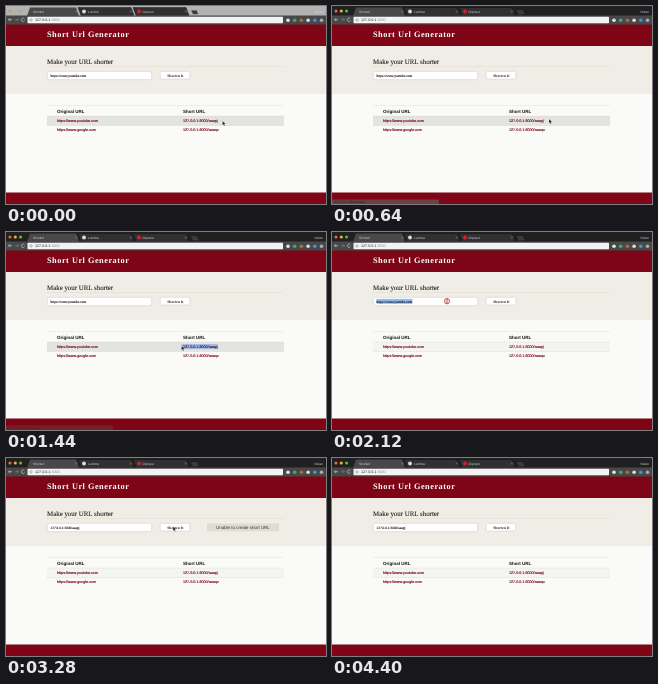
Recreate the animation shown at these times as an HTML page. Size 320x198 px, loop 4.64 s.

```html
<!DOCTYPE html>
<html lang="en">
<head>
<meta charset="utf-8">
<title>Short Url Generator</title>
<style>
html, body { margin: 0; width: 100%; height: 100%; overflow: hidden; background: #fafaf8; }
svg { display: block; width: 320px; height: 198px; text-rendering: geometricPrecision; }
text { font-family: "Liberation Sans", Arial, sans-serif; font-size: 3.7px; white-space: pre; }
.serif { font-family: "Liberation Serif", Times, serif; }
.tab { font-size: 3.2px; fill: #d4d4d4; }
.link { fill: #780019; stroke: #780019; stroke-width: .14; }
.head { font-size: 4.5px; font-weight: bold; fill: #111; }
.field { font-size: 3.45px; fill: #222; stroke: #222; stroke-width: .12; }
.dots { stroke: #c9c7be; stroke-width: .5; stroke-dasharray: .8 .8; }
</style>
</head>
<body>
<svg viewBox="0 0 320 198">
  <rect width="320" height="10" fill="#202020"/>
  <rect id="inactive" width="320" height="10" fill="#b2b2b2"/>
  <path d="M75 9.500l-3-8h53l3 8zM130 9.500l-3-8h53l3 8z" fill="#303030" stroke="#151515" stroke-width=".5"/>
  <path d="M21 10l3-8.500h46l3 8.500z" fill="#484848"/>
  <g id="lights">
    <circle cx="4" cy="5" r="1.600" fill="#ee5b50"/>
    <circle cx="9.300" cy="5" r="1.600" fill="#e5b43d"/>
    <circle cx="14.600" cy="5" r="1.600" fill="#55b848"/>
  </g>
  <text class="tab" x="27" y="6.600">Shorturl</text>
  <circle cx="78" cy="5.500" r="1.900" fill="#ddd"/>
  <text class="tab" x="82" y="6.600">Lumbra</text>
  <circle cx="133" cy="5.500" r="1.900" fill="#d61f2c"/>
  <text class="tab" x="136.300" y="6.600">Clipnest</text>
  <path d="M69.500 4.500l2 2m0-2l-2 2M124 4.500l2 2m0-2l-2 2M179 4.500l2 2m0-2l-2 2" stroke="#aaa" stroke-width=".4"/>
  <path d="M185.500 4.500h5l1.500 3.500h-5z" fill="#383838" stroke="#555" stroke-width=".4"/>
  <text class="tab" id="user" x="308.500" y="6.600">Nolan</text>
  <rect y="9.500" width="320" height="9.500" fill="#484848"/>
  <g fill="none" stroke="#ddd" stroke-width=".6">
    <path d="M6 13.700H2.500l1.500-1.500m-1.500 1.500l1.500 1.500"/>
    <path d="M9 13.700h3.500l-1.500-1.500m1.500 1.500l-1.500 1.500" stroke="#888"/>
    <path d="M18.500 12.800a1.700 1.700 0 1 0 .1 1.700"/>
  </g>
  <rect x="21.500" y="10.800" width="255.500" height="6.400" rx=".8" fill="#f3f3f3"/>
  <circle cx="25" cy="13.900" r="1.200" fill="none" stroke="#777" stroke-width=".5"/>
  <text x="29" y="15.300" fill="#222">127.0.0.1<tspan fill="#888">:3000</tspan></text>
  <g id="icons"></g>

  <rect y="18.500" width="320" height="21.500" fill="#7d0515"/>
  <text class="serif" x="41" y="31.300" fill="#fff" style="font-size:8.3px;font-weight:bold;letter-spacing:.5px">Short Url Generator</text>
  <rect y="40" width="320" height="48" fill="#efede5"/>
  <text class="serif" x="41" y="58.200" fill="#222" stroke="#222" stroke-width=".1" style="font-size:6.9px">Make your URL shorter</text>
  <path class="dots" d="M41 60.500H278"/>
  <rect x="41.300" y="65.300" width="104.400" height="8.400" rx="2" fill="#fff" stroke="#c8c6bf" stroke-width=".5"/>
  <rect id="inputSel" x="44.500" y="66.900" width="36" height="4.900" fill="#8fbcf0"/>
  <text class="serif field" id="input" x="44.600" y="70.600"></text>
  <rect id="button" x="154.200" y="65.300" width="29.600" height="7.800" rx="1.200" fill="#fff" stroke-width=".6"/>
  <text class="serif" x="161.300" y="70.500" fill="#222" style="font-weight:bold">Shorten It</text>
  <svg id="alert" x="201" y="65.300" overflow="hidden">
    <rect width="72" height="8.300" fill="#dfddd3"/>
    <rect id="alertSel" x="16" y="1.500" height="5.500" fill="#9dc0ea"/>
    <text x="9" y="5.800" fill="#333" style="font-size:4.45px">Unable to create short URL</text>
  </svg>

  <path class="dots" d="M41 99.500H278"/>
  <text class="head" x="51" y="106.500">Original URL</text>
  <text class="head" x="177" y="106.500">Short URL</text>
  <rect id="row" x="41" y="110" width="237" height="9.500"/>
  <path class="dots" d="M41 110H278M41 119.500H278"/>
  <rect id="linkSel" y="112" height="5.200" fill="#9dbce6"/>
  <text class="link" x="51" y="116.200">https://www.youtube.com</text>
  <text class="link" x="177" y="116.200">127.0.0.1:3000/aaapj</text>
  <text class="link" x="51" y="125.200">https://www.google.com</text>
  <text class="link" x="177" y="125.200">127.0.0.1:3000/aaaqo</text>
  <rect y="186.500" width="320" height="11.500" fill="#7d0515"/>
  <g id="status">
    <path d="M0 193.500h106q1 0 1 1v3.500H0z" fill="#666"/>
    <text x="2" y="197" fill="#222" style="font-size:3.3px">127.0.0.1:3000/aaapj</text>
  </g>

  <circle id="ring" r="2.700" fill="#f6b5b5" fill-opacity=".6" stroke="#dc4850" stroke-width=".8"/>
  <g id="cursor">
    <path id="arrow" d="M0 0v4.300l1-.9.700 1.600.8-.3-.7-1.600h1.300z" fill="#111" stroke="#fff" stroke-width=".3"/>
    <path id="beam" d="M-.8-2h1.600M0-2v4M-.8 2h1.600" stroke="#222" stroke-width=".4"/>
  </g>
</svg>
<script>
const LOOP = 4640, STEP = 40;
const el = {};
document.querySelectorAll('[id]').forEach(e => el[e.id] = e);
const set = (e, attrs) => { for (const k in attrs) e.setAttribute(k, attrs[k]); };
const show = (e, on) => set(e, { opacity: +on });
const clamp = v => Math.max(0, Math.min(1, v));
const ease = (t, a, b) => (1 - Math.cos(Math.PI * clamp((t - a) / (b - a)))) / 2;
const during = (t, a, b) => t >= a && t < b;

el.icons.innerHTML = ['#dfe6ee', '#4aa56a', '#a8704a', '#ddd', '#4c8fd0', '#aaa']
  .map((c, i) => `<circle cx="${282 + i * 6.7}" cy="14.200" r="1.800" fill="${c}"/>`).join('');

// Pointer stops: time, x, y
const path = [
  [0, 216.5, 115], [600, 217, 113], [1120, 217, 113], [1240, 211, 114],
  [1440, 175.5, 114], [1640, 175.5, 114], [2000, 115, 69], [2360, 115, 69],
  [2640, 167, 68.5], [3520, 167, 68.5], [3640, 218, 70], [3680, 218, 70],
  [3800, 248.5, 70], [4080, 248.5, 70], [4400, 262, 200]
];
// Clicks: start, end, x, y
const clicks = [[1200, 1320, 211, 114], [2040, 2280, 115, 69.2], [2640, 2880, 167, 69], [3640, 3880, 219, 70]];

function pointer(t) {
  const i = path.findIndex(p => p[0] > t);
  if (i < 0) return path[path.length - 1].slice(1);
  const [a, x, y] = path[i - 1], [b, u, v] = path[i], k = ease(t, a, b);
  return [x + (u - x) * k, y + (v - y) * k];
}

function draw(t) {
  const [x, y] = pointer(t);
  set(el.cursor, { transform: `translate(${x} ${y})` });
  const overInput = during(t, 1960, 2560) && x < 146;
  show(el.beam, overInput);
  show(el.arrow, !overInput);
  show(el.cursor, t < 4400);

  const click = clicks.find(c => during(t, c[0], c[1]));
  show(el.ring, 0);
  if (click) set(el.ring, { cx: click[2], cy: click[3], opacity: 1 - .8 * ease(t, click[0] + 80, click[1]) });

  // The window gains focus as the loop starts
  const focus = ease(t, 0, 80);
  show(el.inactive, 1 - focus);
  show(el.lights, .3 + .7 * focus);
  set(el.user, { fill: focus < .5 ? '#444' : '#eee' });

  set(el.status, { opacity: .6 * ease(t, 560, 640) * (1 - ease(t, 1240, 1640)) });
  set(el.row, { fill: during(y, 109, 119.5) ? '#e3e3e2' : '#f4f4f2' });
  set(el.linkSel, { x, width: during(t, 1240, 1720) ? Math.max(0, 211.5 - x) : 0 });

  show(el.inputSel, during(t, 2040, 2320));
  el.input.textContent = t < 2320 ? 'https://www.youtube.com' : '127.0.0.1:3000/aaapj';
  set(el.button, { stroke: during(t, 2640, 3000) ? '#8fb8dc' : '#d0cec8' });

  const grow = ease(t, 2720, 3120) * (1 - ease(t, 4080, 4360));
  set(el.alert, { width: 72 * grow, height: 8.3 * grow, opacity: Math.min(1, 3 * grow) });
  set(el.alertSel, { width: t >= 3640 ? Math.max(0, Math.min(x, 249) - 217) : 0 });
}

function tick() {
  draw(Math.floor(performance.now() % LOOP / STEP) * STEP);
  requestAnimationFrame(tick);
}
tick();
</script>
</body>
</html>
```
